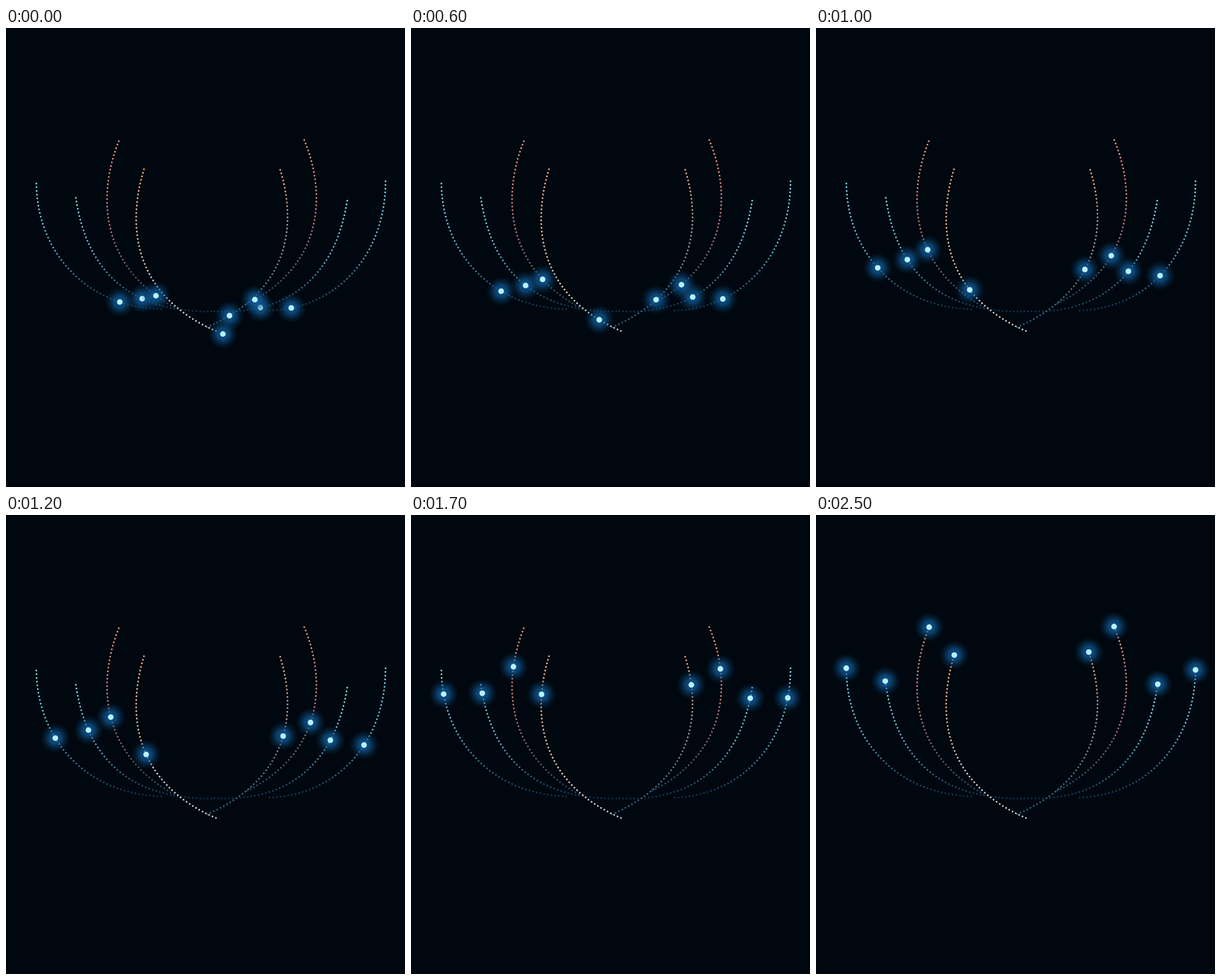
An HTML page for the animation above (3000 ms loop, 697 px wide and 803 px high).

```html
<!DOCTYPE html>
<html lang="en">
<head>
<meta charset="utf-8">
<title>Light trails</title>
<style>
html, body { margin: 0; width: 100%; height: 100%; overflow: hidden; background: #00070f; }
svg { display: block; width: 697px; height: 803px; }
.trail { fill: none; stroke-width: 3.1; stroke-linecap: round; stroke-dasharray: 0 6.5; }
</style>
</head>
<body>
<svg id="stage" viewBox="0 0 697 803">
  <defs>
    <radialGradient id="glow">
      <stop offset="0" stop-color="#1267ac" stop-opacity=".85"/>
      <stop offset=".4" stop-color="#105c9a" stop-opacity=".68"/>
      <stop offset=".7" stop-color="#0c4878" stop-opacity=".34"/>
      <stop offset="1" stop-color="#0a3a5c" stop-opacity="0"/>
    </radialGradient>
  </defs>
</svg>
<script>
const LOOP = 3000, STEP = 100, LAST = 2500, LEAD = 30;
const stage = document.getElementById('stage');
const defs = stage.querySelector('defs');

// Evenly spaced colours from the top of a trail to its bottom
const tints = {
  cyan: ['#84e4f6', '#5cb4d2', '#0d3651'],
  pink: ['#f09a86', '#c27c78', '#1a4a6a'],
  gold: ['#f6b27c', '#f0b68c', '#d8d0c0', '#d2d6cc'],
  fade: ['#f4b282', '#909699', '#205f80']
};

// Each trail is one curve drawn from its tip. Its spark travels between two
// distances from the tip (negative is beyond it) in span ms.
const strands = [
  { tint: 'cyan', curve: 'M53,272 C55,398 146,490 274,492', from: 271, to: -4, span: 2360 },
  { tint: 'cyan', curve: 'M122,297 C140,418 208,499 365,496', from: 221, to: -6.5, span: 2160 },
  { tint: 'pink', curve: 'M197,198 C159,293 164,420 298,491', from: 301, to: -2, span: 2560 },
  { tint: 'gold', curve: 'M241,247 C211,345 221,468 369,531', from: 358, to: -2, span: 2440 },
  { tint: 'cyan', curve: 'M663,268 C663,395 580,492 456,494.5', from: 300, to: 3, span: 2360 },
  { tint: 'cyan', curve: 'M596,302 C578,418 508,506 358,495', from: 257, to: -6, span: 2160 },
  { tint: 'pink', curve: 'M521,196 C559,287 558,417 416,485', from: 323, to: -1, span: 2560 },
  { tint: 'fade', curve: 'M479,248 C507,340 500,460 348,525', from: 294, to: -8.5, span: 2440 }
];

function add(name, attrs, parent = stage) {
  const el = document.createElementNS('http://www.w3.org/2000/svg', name);
  for (const key in attrs) el.setAttribute(key, attrs[key]);
  parent.appendChild(el);
  return el;
}

// Point at a distance along the path, continued past either end
function pointAlong(path, distance) {
  const held = Math.min(Math.max(distance, 0), path.getTotalLength());
  const p = path.getPointAtLength(held);
  const q = path.getPointAtLength(2 * held - distance);
  return [2 * p.x - q.x, 2 * p.y - q.y];
}

function ease(time, span) {
  const x = Math.min((time + LEAD) / span, 1);
  return (1 - Math.cos(Math.PI * x)) / 2;
}

for (const id in tints) {
  const gradient = add('linearGradient', { id, x2: 0, y2: 1 }, defs);
  tints[id].forEach((color, i, all) =>
    add('stop', { offset: i / (all.length - 1), 'stop-color': color }, gradient));
}

for (const strand of strands)
  strand.path = add('path', { class: 'trail', d: strand.curve, stroke: `url(#${strand.tint})` });

for (const strand of strands) {
  strand.spark = add('g', {});
  add('circle', { r: 26, fill: 'url(#glow)' }, strand.spark);
  add('circle', { r: 4.9, fill: '#b9f0fc' }, strand.spark);
}

function draw(time) {
  const t = Math.min(Math.floor((time % LOOP) / STEP) * STEP, LAST);
  for (const { path, spark, from, to, span } of strands) {
    const distance = from + (to - from) * ease(t, span);
    spark.setAttribute('transform', `translate(${pointAlong(path, distance)})`);
  }
}

const start = performance.now();
function tick() {
  draw(performance.now() - start);
  requestAnimationFrame(tick);
}
tick();
</script>
</body>
</html>
```
